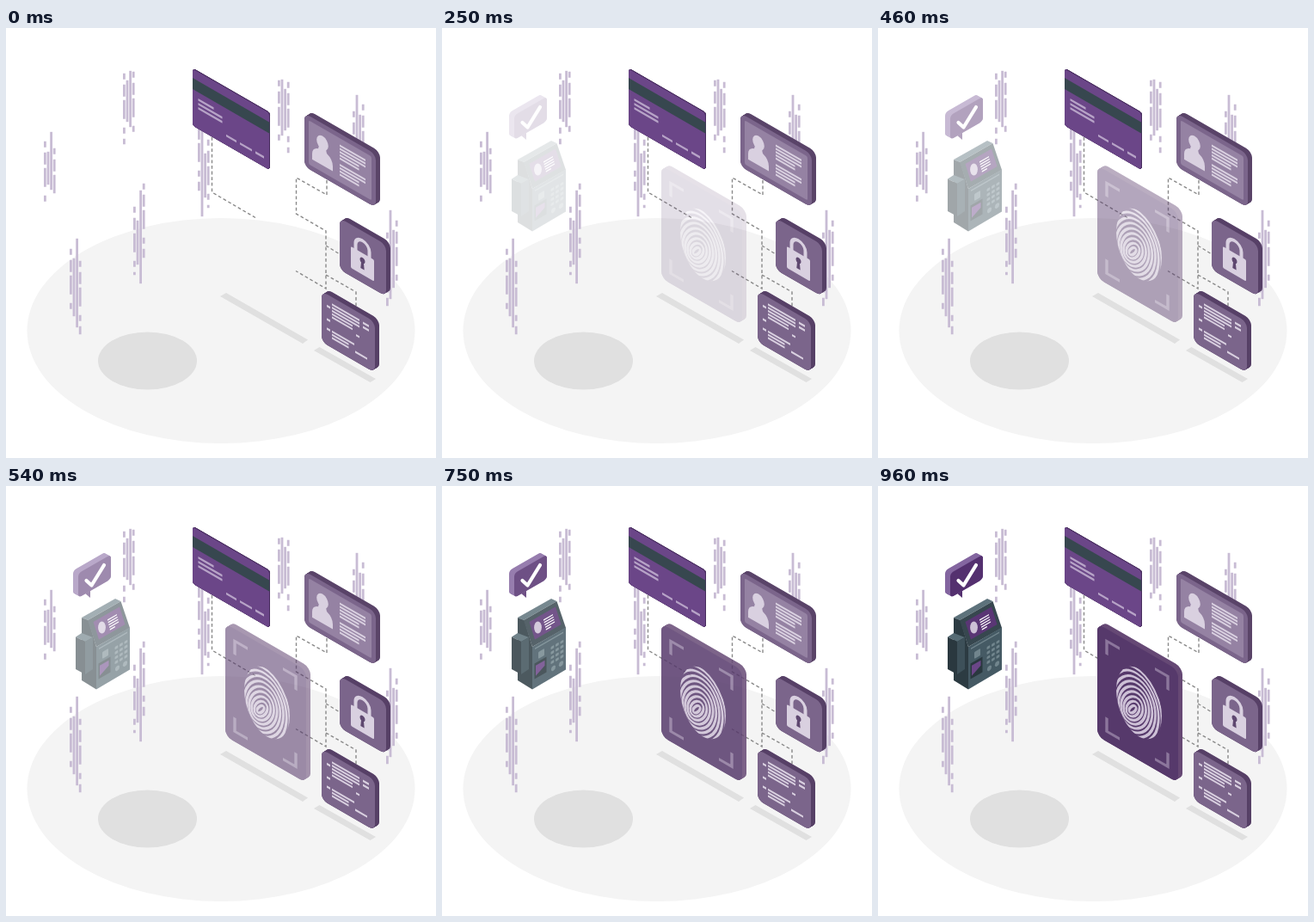
Write an HTML page with a canvas that moves like this. It is 500 px wide and 500 px high and loops after 1 s.

```html
<!DOCTYPE html>
<html lang="en">
<head>
<meta charset="utf-8">
<title>Biometric access</title>
<style>
html, body { margin: 0; width: 100%; height: 100%; overflow: hidden; background: #fff; }
canvas { position: absolute; left: 0; top: 0; width: 500px; height: 500px; }
</style>
</head>
<body>
<canvas id="scene" width="500" height="500"></canvas>
<canvas id="fade" width="500" height="500"></canvas>
<script>
const SLOPE = 0.577;
const LOOP = 1000;
const PALE = '#d9d0e0';
const MAUVE = '#7b658b';
const PLUM = '#574067';
const sceneCanvas = document.getElementById('scene');
const fadeCanvas = document.getElementById('fade');
let ctx = sceneCanvas.getContext('2d');

// Draws on a wall that falls (dir 1) or rises (dir -1) to the right.
function plane(x, y, dir, draw) {
  ctx.save();
  ctx.transform(1, SLOPE * dir, 0, 1, x, y);
  draw();
  ctx.restore();
}

function fill(color, d) {
  ctx.fillStyle = color;
  ctx.fill(new Path2D(d));
}

function stroke(color, width, d) {
  ctx.strokeStyle = color;
  ctx.lineWidth = width;
  ctx.stroke(new Path2D(d));
}

function ellipse(color, x, y, rx, ry) {
  ctx.fillStyle = color;
  ctx.beginPath();
  ctx.ellipse(x, y, rx, ry, 0, 0, Math.PI * 2);
  ctx.fill();
}

function box(color, x, y, w, h, r = 0) {
  ctx.fillStyle = color;
  ctx.beginPath();
  ctx.roundRect(x, y, w, h, r);
  ctx.fill();
}

// Rounded plate whose edge is swept back by (dx, dy).
function plate(x, y, dir, w, h, r, front, side, dx, dy) {
  for (let k = 1; k > 0; k -= 0.1) {
    plane(x + dx * k, y + dy * k, dir, () => box(side, 0, 0, w, h, r));
  }
  plane(x, y, dir, () => box(front, 0, 0, w, h, r));
}

// Text lines, the last two of them shorter.
function para(color, x, y, count, width, step = 3.75) {
  for (let i = 0; i < count; i++) {
    const len = i < count - 2 ? width : width * 0.75;
    stroke(color, 2.2, `M${x} ${y + i * step}h${len}`);
  }
}

function floor() {
  ellipse('#f4f4f4', 250, 352, 225.5, 131);
  ellipse('#e0e0e0', 164.5, 387, 57.5, 33.5);
  fill('#e0e0e0', 'M249 312L256 308 351 362.5 345 367ZM358 375L364.500 371 430 408 423.500 412Z');
}

// Two solid bars between two broken ones; spans are [top, bottom].
function bars(x, y, dir, spans) {
  spans.forEach(([top, bottom], i) => {
    const column = dir < 0 ? i : 3 - i;
    ctx.setLineDash(i % 3 ? [] : [7, 6, 14, 4, 22, 10]);
    plane(x + column * 3.6, y, 0, () => {
      stroke('#c8bcd4', 2.8, `M1.400 ${top + 0.8}V${bottom - 0.8}`);
    });
  });
  ctx.setLineDash([]);
}

// Each cluster appears on the left and mirrored on the right.
function allBars() {
  const pair = (x1, y1, x2, y2, spans) => {
    bars(x1, y1, -1, spans);
    bars(x2, y2, 1, spans);
  };
  pair(44, 120, 403, 77, [[11, 85], [23, 63], [0, 69], [19, 73]]);
  pair(136, 48, 316, 58, [[4, 88], [12, 62], [1, 68], [2, 75]]);
  pair(148, 180, 223, 102, [[27, 108], [43, 96], [8, 118], [0, 88]]);
  pair(74, 244, 442, 211, [[12, 87], [23, 92], [0, 105], [26, 113]]);
}

function links() {
  ctx.setLineDash([3.8, 2.8]);
  stroke('#8a8a8a', 1.4, 'M239.500 127V191L290 220.500M373 177V194L337.500 174V216L372 236V303L337 282.500' +
    'M372 253L388 263M372 287L407 307V326');
  ctx.setLineDash([]);
}

function bankCard() {
  const ink = '#b7a3c7';
  plate(217, 47.5, 1, 89, 66, 3, '#6b4688', '#4a2f60', 1, -0.6);
  plane(217, 47.5, 1, () => {
    box('#37474f', 0, 10.5, 89.5, 13);
    stroke(ink, 2.6, 'M6.500 32h18m-18 5h28m-28 5h28');
    stroke(ink, 2.6, 'M39 55h12m4 0h14m4 0h10');
  });
}

function idCard() {
  plate(347, 99, 1, 83, 62, 7, MAUVE, '#5a4469', 5, -3);
  plane(347, 99, 1, () => {
    box('#9582a3', 5, 5.5, 73, 51, 2);
    ellipse(PALE, 21, 22.5, 6.8, 8);
    fill(PALE, 'M9 48.500V42Q9 35 16 32L17 28H25L26 32Q33 35 33 43V48.500Z');
    para(PALE, 41, 14, 5, 30);
    para(PALE, 41, 36.5, 4, 30);
  });
}

function lockCard() {
  plate(388, 221, 1, 54, 60, 7, MAUVE, PLUM, 5, -3);
  plane(388, 221, 1, () => {
    stroke(PALE, 4, 'M18.500 27V19A8 8 0 0 1 34.500 19V27');
    box(PALE, 13, 25.5, 27, 25, 1.5);
    ellipse('#5f4870', 26.5, 34, 3, 3.4);
    fill('#5f4870', 'M25.300 34H27.700L28.700 44H24.300Z');
  });
}

function listCard() {
  plate(367, 306, 1, 62, 59, 7, MAUVE, PLUM, 5, -3);
  plane(367, 306, 1, () => {
    para(PALE, 12, 8.5, 5, 32);
    para(PALE, 12, 40, 3, 26);
    stroke(PALE, 2.4, 'M6 13.500h4M6 29h4M6 40h4M48 9h7m-7 5h7M40 28h4M39 48h14');
  });
}

// Nested loops that lean less and drift upwards as they grow.
function fingerprint(ink) {
  ctx.save();
  ctx.beginPath();
  ctx.ellipse(48.5, 64, 26.5, 39.5, 0, 0, Math.PI * 2);
  ctx.clip();
  ctx.strokeStyle = ink;
  ctx.lineWidth = 2.7;
  for (let k = 0; k < 9; k++) {
    ctx.beginPath();
    ctx.ellipse(41 + k * 0.35, 76 - k * 0.75, 2.5 + 3.6 * k, 6.5 + 4.7 * k,
      0.6 * (1 - k / 8), 0, Math.PI * 2);
    ctx.stroke();
  }
  ctx.restore();
}

function scanner() {
  plate(255, 160, 1, 94, 131, 8, '#56396b', '#664975', 5, -3);
  plane(255, 160, 1, () => {
    stroke('#8c769c', 3.4, 'M11 30V14H26M67 14H82V30M11 103V119H26M67 119H82V103');
    fingerprint('#cdc0d6');
  });
}

function bubble() {
  const front = '#54306f';
  fill(front, 'M91 124L98 119V130Z');
  plate(84, 101.5, -1, 38, 28.5, 4, front, '#8466a0', -6, -3.2);
  ctx.lineCap = ctx.lineJoin = 'round';
  stroke('#fff', 4.2, 'M93.500 110L99.500 115.500 114 92');
  ctx.lineCap = 'butt';
  ctx.lineJoin = 'miter';
}

function terminal() {
  // casing
  fill('#2c3b42', 'M88 153L96 156 105 187V236.500L88 226Z');
  fill('#5d727b', 'M88 153L127 131 133.500 134 95 156Z');
  fill('#37474f', 'M95 156L133.500 134 144 165 105 187Z');
  fill('#455a64', 'M105 187L144 164.500V213.500L105 236.500Z');
  // side unit
  fill('#566b74', 'M81 175.500L88 171 101 176 92 181Z');
  fill('#2a383f', 'M81 175.500L92 181V219L81 213Z');
  fill('#3d5059', 'M92 181L101 176V213L92 219Z');
  // display
  fill('#5a3675', 'M101.500 158L132 140.500 138.500 161 108 178.500Z');
  ellipse('#cdc0d6', 111.5, 164.5, 4.4, 7);
  for (let i = 0; i < 5; i++) {
    plane(118 + i * 0.7, 156 + i * 2.75, -1, () => stroke('#fff', 1.4, `M0 0h${i < 4 ? 11 : 6}`));
  }
  plane(105, 187, -1, () => {
    const key = '#71858d';
    box(key, 3, 3.2, 33, 1.6);
    box(key, 7, 10, 7, 8, 1);
    box('#2a383f', 2.5, 21, 14, 18);
    fill('#6b4688', 'M4 24H14.500V30L4 36Z');
    for (let i = 0; i < 12; i++) {
      box(key, 21.5 + i % 3 * 5.5, 12.5 + Math.floor(i / 3) * 5.7, 3.8, 3.2, 1);
    }
    ellipse(key, 24.5, 39, 2.6, 2.8);
    ellipse(key, 33.5, 39, 2.6, 2.8);
  });
}

[floor, allBars, links, bankCard, idCard, lockCard, listCard].forEach(draw => draw());
ctx = fadeCanvas.getContext('2d');
[scanner, bubble, terminal].forEach(draw => draw());

const start = performance.now();
function frame() {
  const t = (performance.now() - start) % LOOP / LOOP;
  fadeCanvas.style.opacity = t < 0.17 ? 0 : t * t * (3 - 2 * t);
  requestAnimationFrame(frame);
}
frame();
</script>
</body>
</html>
```
